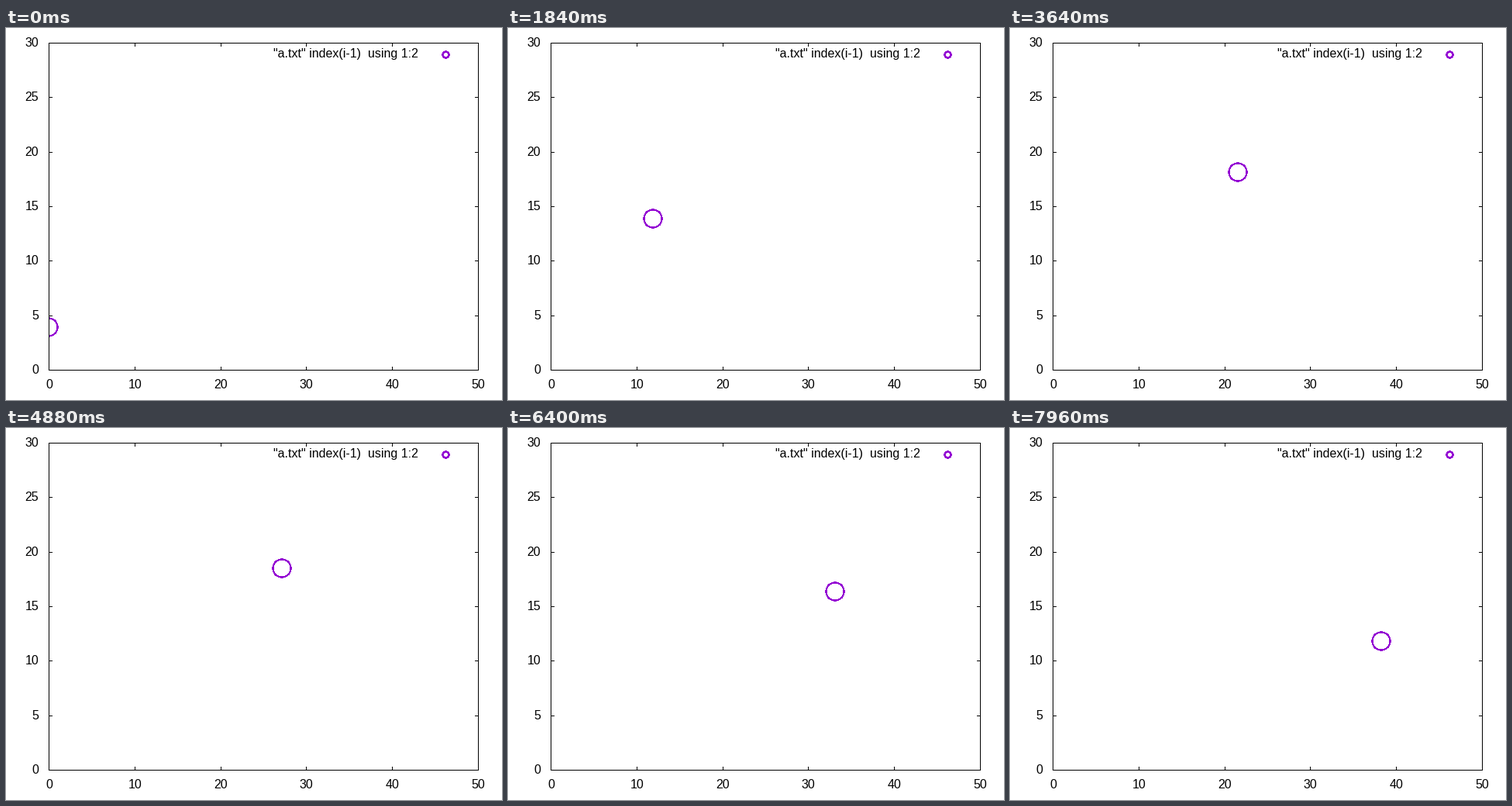
A matplotlib script for the animation above (8000 ms loop, 640x480 px).

```python
import math

import matplotlib.pyplot as plt
from matplotlib.animation import FuncAnimation
from matplotlib.patches import Circle, Rectangle

W, H, DPI = 640, 480, 100
PX = 72 / DPI                                  # one pixel in points
LEFT, RIGHT, TOP, BOTTOM = 55, 609, 19, 441    # plot border
X_UNIT = (RIGHT - LEFT) / 50
Y_UNIT = (BOTTOM - TOP) / 30
PURPLE = "#9400d3"
FRAMES, INTERVAL = 200, 40

# Projectile with linear air drag
DT, DRAG, GRAVITY = 1 / 70, 0.3, 9.8
SPEED_X, SPEED_Y, START_Y = 20, 20, 3.91

plt.rcParams["font.family"] = "Liberation Sans"

fig = plt.figure(figsize=(W / DPI, H / DPI), dpi=DPI, facecolor="white")
ax = fig.add_axes([0, 0, 1, 1])
ax.set_xlim(0, W)
ax.set_ylim(H, 0)
ax.axis("off")


def nearest(v):
    return math.floor(v + 0.5)


def bar(x, y, w, h):
    ax.add_patch(Rectangle((x, y), w, h, fc="black", lw=0, aa=False, zorder=3))


def label(x, y, text, align):
    ax.text(x, y, text, size=16 * PX, ha=align, va="baseline", color="black")


def ring(x, y, r):
    return ax.add_patch(Circle((x, y), r, fill=False, ec=PURPLE, lw=1.1 * PX,
                               aa=False, zorder=2))


def position(n):
    t = n * DT
    decay = (1 - math.exp(-DRAG * t)) / DRAG
    fall = GRAVITY / DRAG
    x = SPEED_X * decay
    y = START_Y + (SPEED_Y + fall) * decay - fall * t
    return nearest(LEFT + x * X_UNIT), nearest(BOTTOM - y * Y_UNIT)


# Border
for y in (TOP, BOTTOM):
    bar(LEFT, y, RIGHT - LEFT + 1, 1)
for x in (LEFT, RIGHT):
    bar(x, TOP, 1, BOTTOM - TOP + 1)

# Tics and their labels
for v in range(0, 51, 10):
    x = nearest(LEFT + v * X_UNIT)
    bar(x, TOP, 1, 5)
    bar(x, BOTTOM - 4, 1, 5)
    label(x + 0.5, 465, str(v), "center")
for v in range(0, 31, 5):
    y = nearest(BOTTOM - v * Y_UNIT)
    bar(LEFT, y, 5, 1)
    bar(RIGHT - 4, y, 5, 1)
    label(42, y + 5, str(v), "right")

# Key
label(532, 38, '"a.txt" index(i-1)  using 1:2', "right")
ring(567.5, 34.5, 4)

ball = ring(*position(0), 11.5)
ball.set_clip_path(Rectangle((LEFT, TOP), RIGHT - LEFT, BOTTOM - TOP,
                             transform=ax.transData))


def update(n):
    ball.center = position(n)
    return (ball,)


anim = FuncAnimation(fig, update, frames=FRAMES, interval=INTERVAL,
                     repeat=True, repeat_delay=0, blit=False)
plt.show()
```
